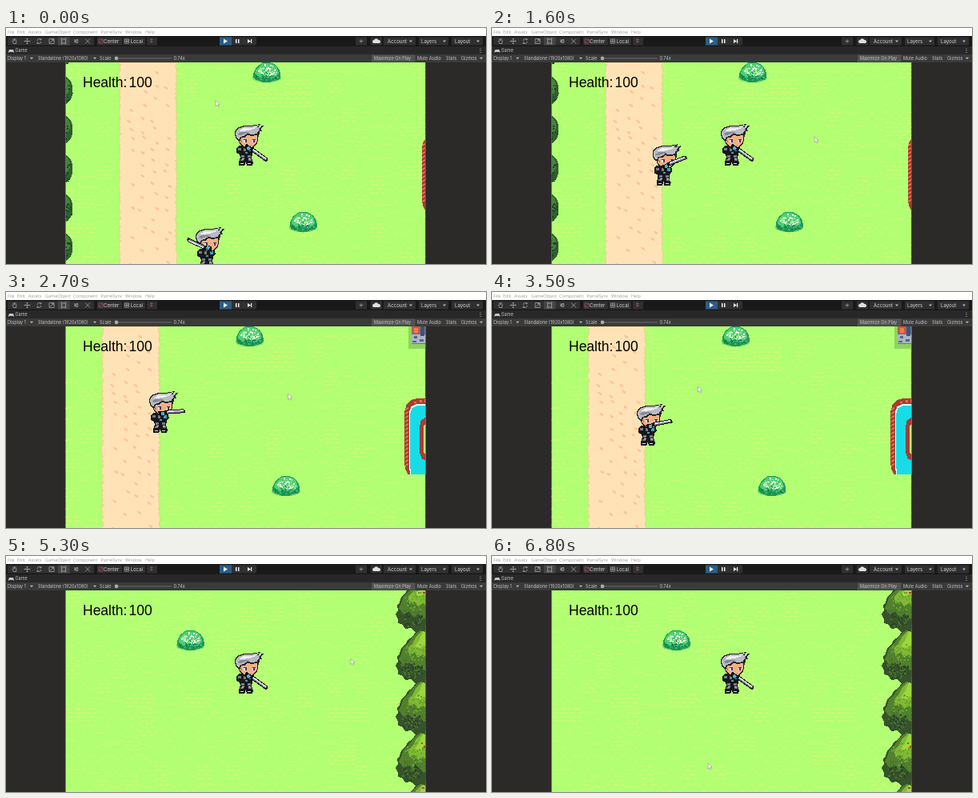
Write an HTML page that moves like this. It is 600x295 px and loops after 6900 ms.

```html
<!DOCTYPE html>
<html lang="en">
<head>
<meta charset="utf-8">
<title>Game view</title>
<style>
  html, body { margin: 0; width: 100%; height: 100%; overflow: hidden; background: #2b2a29; }
  svg { display: block; width: 100vw; height: 100vh; }
  .ui { font-family: Inter, sans-serif; font-size: 5.5px; fill: #c4c4c4; }
  .tool { font-size: 6.1px; fill: #d2d2d2; }
  .menu { font-family: "Open Sans", sans-serif; font-size: 5.5px; fill: #9a9a9a; }
  .health { font-family: "Liberation Sans", Arial, sans-serif; font-size: 17.5px; fill: #000; }
  .px { shape-rendering: crispEdges; }
  .icon { fill: none; stroke: #b4b4b4; stroke-width: .7; }
  .red { stroke: #b0525c; }
</style>
</head>
<body>
<svg id="stage" viewBox="0 0 600 295"></svg>
<script>
const LOOP = 6900, STEP = 100;

function seeded(seed) {
  return () => (seed = (seed * 16807) % 2147483647) / 2147483647;
}
const rect = (x, y, w, h, fill, extra = '') =>
  `<rect x="${x}" y="${y}" width="${w}" height="${h}" fill="${fill}" ${extra}/>`;
const ellipse = (x, y, rx, ry, fill) =>
  `<ellipse cx="${x}" cy="${y}" rx="${rx}" ry="${ry}" fill="${fill}"/>`;
const path = (d, fill, extra = '') => `<path d="${d}" fill="${fill}" ${extra}/>`;
const text = (x, y, s, cls = 'ui') => `<text x="${x}" y="${y}" class="${cls}">${s}</text>`;
const at = (x, y, body) => `<g transform="translate(${x} ${y})">${body}</g>`;
const caret = (x, y) => path(`M${x} ${y}h4l-2 2.4z`, '#b8b8b8');

// Sprinkles small marks inside an ellipse.
function speckle(rnd, count, x, y, rx, ry, size) {
  let d = '';
  for (let i = 0; i < count; i++) {
    const a = rnd() * 6.283, r = Math.sqrt(rnd());
    d += `M${(x + Math.cos(a) * r * rx).toFixed(1)} ${(y + Math.sin(a) * r * ry).toFixed(1)}h${size}v${size}h-${size}z`;
  }
  return d;
}

// Thin rows of tufts, with dense patches scattered between them.
function grass(seed, width) {
  const rnd = seeded(seed), CELL = 18;
  let d = '';
  const tuft = (x, y) => d += `M${x} ${y}h1v1h1v-1h2v1h1v1h-4v-1h-1z`;
  for (let y = 46; y < 295; y += CELL) {
    for (let x = 76; x < 75 + width; x += CELL) {
      const kind = rnd();
      if (kind < .14) {
        for (let i = 0; i < 12; i++) tuft(x + (i % 3) * 6 + (i % 2) * 2, y + Math.floor(i / 3) * 5);
      } else if (kind < .85) {
        for (let i = 0; i < 3; i++) tuft(x + i * 6, y + 4 + Math.floor(rnd() * 3) * 4);
      }
    }
  }
  return rect(74, 43, width, 252, '#b2ff73') + path(d, '#cafa76');
}

function road() {
  const rnd = seeded(41);
  let left = '', right = '', spots = '';
  for (let y = 43; y < 296; y += 2) {
    left += `L${(141 + rnd() * 2).toFixed(1)} ${y}v2`;
    right = `L${(213.8 - rnd() * 2).toFixed(1)} ${y + 2}v-2` + right;
  }
  for (let y = 50; y < 295; y += 14) {
    for (let x = 149; x < 208; x += 15) {
      if (rnd() < .3) continue;
      const px = x + rnd() * 8, py = y + rnd() * 9;
      spots += `M${px.toFixed(1)} ${py.toFixed(1)}h3v1h2v3h-2v-1h-2v-2h-1z`;
    }
  }
  return path('M142 43' + left + right + 'z', '#ffe3b6', 'stroke="#e6d28b" stroke-width=".8"') +
    path(spots, '#ffc3a0');
}

function bush(x, y) {
  const rnd = seeded(17);
  return at(x, y,
    ellipse(0, 7, 18, 6.5, '#7fd96a') +
    path('M-17 6L-17 2-15-2-13-6-9-9-5-12H4L9-10 13-7 16-2 17 2 17 7 14 10 8 11 4 13H-5L-9 11-14 10z', '#1f9a58') +
    path('M-15 2L-13-4-9-8-5-11H4L9-9 13-5 15 2 10 6 5 4 1 7-4 5-9 7z', '#4fce74') +
    path(speckle(rnd, 30, -1, 5, 14, 5, 1.5), '#118050') +
    path(speckle(rnd, 22, 0, 6, 14, 4, 1.5), '#3fbf70') +
    path(speckle(rnd, 40, 0, -2, 13, 7, 1.5), '#9df08c') +
    path(speckle(rnd, 24, 0, -3, 12, 7, 1.8), '#f4fff0'));
}

// A fir-like crown cut by the right edge of the view; y is its foot.
function crown(y) {
  const rnd = seeded(Math.round(y) + 5);
  return at(524, y,
    path('M4-76L-3-71-6-66-12-62-16-56-22-52-25-46-30-42-32-35-35-31-34-25-37-20-34-14-34-9-28-7-25-2-18-3-13 2-6 0 4 3z', '#36532b') +
    path('M4-74L-5-65-13-59-20-50-27-43-30-34-33-28-27-20-20-24-15-17-8-21-2-14 4-17z', '#52812d') +
    path('M4-72L-4-64-11-57-15-49-21-42-20-34-13-36-9-30-3-34 4-28z', '#80ba34') +
    path('M4-69L-4-60-8-51-13-44-6-42-2-46 4-42z', '#9cd83d') +
    path(speckle(rnd, 40, -18, -19, 14, 14, 2), '#4b7430') +
    path(speckle(rnd, 24, -17, -14, 14, 11, 2), '#294428') +
    path(speckle(rnd, 30, -14, -38, 12, 14, 2), '#6ca331'));
}

function hedge() {
  let s = '';
  const rnd = seeded(9);
  for (let y = 29; y < 300; y += 49) {
    s += ellipse(73, y, 10.5, 17, '#2d6130') + ellipse(73, y - 5, 7, 10, '#488238') +
      path(speckle(rnd, 24, 74, y + 3, 8, 13, 1.6), '#1d4428');
  }
  return s;
}

function pond() {
  let rim = '';
  for (let y = 146; y < 219; y += 5) rim += `M520 ${y}l4-2v2l-4 2z`;
  return path('M524 228L521 222 519.5 214V150L522 141 528 135 535 133H570V228z', '#a83d35') +
    path(rim, '#e5705a') +
    path('M527 228L525 218V151L528 143 535 140H570V228z', '#e4fff8') +
    path('M528 228L526.5 218V152L529 145 536 142H570V228z', '#18dce5') +
    path('M570 157H545L540 161 538.5 168V201L541 208 546 211H570z', '#a83d35') +
    path('M570 163H548L543.5 168V200L548 205H570z', '#b2ff73') +
    path('M531 137h3v2h-3zM538 135h3v3h-3zM544 134h2v4h-2z', '#e5705a');
}

const house = () =>
  rect(524.5, 43, 40, 27.5, '#8fd361') + rect(528, 43, 40, 22, '#6b7590') +
  rect(529, 43, 9, 9, '#d65532') + rect(531, 45, 5, 6, '#ed7c49') +
  rect(528, 53, 40, 11, '#aab6c8') + rect(539, 43, 5, 12, '#445078') +
  path('M531 55h4v3h-4zM538 59h5v3h-5zM529 61h5v2h-5z', '#59647f');

const BODY =
  // torso and legs
  path('M-14 3L-11 0H7L9 6 6 10 5 16 7 21 6 25H-1L-2 20-4 25H-11L-11 20-9 15-10 11-14 9z', '#17171c') +
  path('M-12 3h4v3h-4zM-5 3h3v4h-3zM-8 12h4v3h-4zM0 12h4v3h-4zM-9 17h4v2h-4zM1 17h4v2h-4z', '#767b86') +
  path('M-9 22h4v1h-4zM0 22h4v1h-4zM-7 16h3v1h-3zM1 16h3v1h-3z', '#dfe2e8') +
  path('M2 3h4v4h-4zM-3 8h3v2h-3z', '#3f9fae') +
  // face
  path('M-11-14H13L13-6 11-1 6 3H-3L-8 0-11-5z', '#2a1a1a') +
  path('M-10-14H12L12-6 10-2 5 2H-2L-7-1-10-5z', '#f0b084') +
  path('M-9-7h2v3h-2zM-1 0h6v1h-6z', '#c97a5c') +
  path('M-5-7h4v3h-4zM6-7h3v3h-3z', '#f8ecea') +
  path('M-5-8h4v1h-4zM-3-7h2v3h-2zM6-8h4v1h-4zM7-7h2v3h-2z', '#4a3560') +
  // hair
  path('M-12-6L-15-10-16-15-15-20-11-23-5-25H3L10-26 16-27 14-24 20-25 17-21 18-18 15-18 14-10 11-13 5-12 0-13-4-10-8-10-9-6z', '#26262b') +
  path('M-12-8L-14-11-15-15-14-19-10-22-4-24H4L10-25 14-26 11-23 17-24 14-20 15-19 13-18 12-15 5-14 0-15-5-12-9-11-10-8z', '#b9bbc2') +
  path('M-11-18L-5-22H5L12-24 8-21 1-19-7-18z', '#f0f0f3') +
  path('M-13-14L-8-17-1-17 4-16-3-15-9-13z', '#868995');

const GUN =
  path('M-5-2H3L5-3H27L29-1V2H4L2 4H-3z', '#0b0c10') +
  rect(6, -2, 21, 1.5, '#eceef1') + rect(6, -.5, 21, 1.5, '#80848e') +
  path('M-1-1h4v4h-4z', '#4fb4c4');

const hero = id => `<g id="${id}">${BODY}<g id="${id}Gun">${GUN}</g></g>`;

function sparkShape() {
  const rnd = seeded(23);
  return path('M-9-3h6v-2h6v2h4v2h7v1h-6v2h4v1h-7v2h-6v1h-5v-3h-6v-1h4z', '#d8fbff', 'opacity=".75"') +
    path(speckle(rnd, 22, -1, 0, 10, 6, 1.3), '#6dbcf4') +
    path(speckle(rnd, 24, 1, 0, 12, 7, 1.2), '#fff') +
    path('M-6-3h8v1h-7v4h5v-2h-2v-1h3v4h-7z', '#438fd8') +
    path('M5-2L16-6 8 0 17 1 7 2 14 7 3 3z', '#f4ffff');
}

function editor() {
  const menu = [[2, 'File'], [14, 'Edit'], [28, 'Assets'], [49, 'GameObject'], [84, 'Component'],
    [118.5, 'ParrelSync'], [149, 'Window'], [174, 'Help']];
  const buttons = [[2, 108], [114, 31], [146, 28], [176, 13], [267, 46], [437, 14], [456, 14],
    [472, 40], [516, 37], [557, 39]];
  const icons = 'M8 16l1.500 3.500h3L13 15.500M9 16.500v-3M10.500 16v-3M12 16v-3' +
    'M23 16.500h7M26.500 13v7M24 15.500l-1 1 1 1M29 15.500l1 1-1 1M25.500 14l1-1 1 1M25.500 19l1 1 1-1' +
    'M39 16a2.800 2.800 0 0 1 5-1.500M44 17a2.800 2.800 0 0 1-5 1.500M44 13v1.800h-2M39 20v-1.800h2' +
    'M54 13.500h6v6h-6zM55 18.500l4-4M57 14.500h2v2' +
    'M69.500 14h5v5h-5zM68.500 13h2M73.500 13h2M68.500 20h2M73.500 20h2' +
    'M85 18l5-4M85 14.500l5 4M86 16.500a2 2 0 1 0 4 0 2 2 0 1 0-4 0' +
    'M99 13.500l6 6M105 13.500l-6 6' +
    'M148.500 14h5v5h-5zM151 14v5M148.500 16.500h5';
  const redIcons = 'M116 14h5v5h-5zM116 19l5-5M180 14.500h4M180 17h4M181.500 13v6';
  return rect(0, 0, 600, 10, '#fff') + menu.map(([x, s]) => text(x, 7, s, 'menu')).join('') +
    rect(0, 10, 600, 13, '#191919') +
    buttons.map(([x, w]) => rect(x, 11.5, w, 10, '#303030')).join('') +
    rect(65, 11.5, 14.5, 10, '#464646') + rect(267, 11.5, 15, 10, '#2c5d87') +
    path(icons, 'none', 'class="icon"') + path(redIcons, 'none', 'class="icon red"') +
    path('M444 14v5M441.500 16.500h5M442.500 15l3 3M445.500 15l-3 3', 'none', 'class="icon" opacity=".6"') +
    path('M272 13.5l5 3-5 3zM287 14h1.5v5h-1.5zM290 14h1.5v5h-1.5zM302 14l4 2.5-4 2.5zM306 14h1.2v5h-1.2z', '#eee') +
    path('M460 19a2 2 0 0 1 0-4 3 3 0 0 1 5.5 0 2 2 0 0 1 1 4z', '#ddd') +
    text(122, 18.8, 'Center', 'ui tool') + text(155.5, 18.8, 'Local', 'ui tool') +
    text(477, 18.8, 'Account', 'ui tool') + text(519, 18.8, 'Layers', 'ui tool') +
    text(561, 18.8, 'Layout', 'ui tool') + caret(504, 15.5) + caret(546, 15.5) + caret(588, 15.5) +
    rect(0, 23, 600, 10, '#282828') +
    path('M4 27h5l1.5 4-2-1h-4l-2 1z', '#c4c4c4') + text(11.5, 30.3, 'Game') +
    path('M592.5 25.5h1v1h-1zM592.5 27.7h1v1h-1zM592.5 30h1v1h-1z', '#bbb') +
    rect(0, 33, 600, 10, '#3a3a3a') + rect(457, 33.5, 54.5, 9, '#525252') +
    text(2, 40, 'Display 1') + caret(30, 36.8) + text(40, 40, 'Standalone (1920x1080)') +
    caret(109, 36.8) + text(117, 40, 'Scale') + rect(137, 37.5, 70, .8, '#777') +
    '<circle cx="138" cy="37.9" r="2.3" fill="#aaa"/>' + text(209.5, 40, '0.74x') +
    text(460, 40, 'Maximize On Play') + text(514, 40, 'Mute Audio') + text(550, 40, 'Stats') +
    text(569, 40, 'Gizmos') + caret(592, 36.8);
}

const treeRow = [93, 157, 221, 285, 349].reverse().map(crown).join('');
document.getElementById('stage').innerHTML =
  '<defs><clipPath id="view"><rect x="74.5" y="43" width="449.7" height="252"/></clipPath></defs>' +
  rect(0, 0, 600, 295, '#2b2a29') +
  `<g clip-path="url(#view)" class="px">
    <g id="field">${grass(7, 510)}${road()}${hedge()}${bush(326, 55)}${bush(371.5, 242)}${pond()}${house()}</g>
    <g id="forest">${grass(73, 451)}${bush(230.5, 105)}${treeRow}
      ${path('M521 45h3v2h-3zM519 233h2v2h-2zM522 237h2v3h-2zM520 289h3v2h-3z', '#b4404a')}</g>
    ${hero('player')}${hero('rival')}<g id="spark">${sparkShape()}</g>
  </g>` + editor() +
  text(96, 74.4, 'Health:', 'health') + text(153.5, 74.4, '100', 'health') +
  `<g id="cursor">${path('M0 0V7L1.7 5.5 3 8 4.2 7.4 3 5H5z', '#fff', 'stroke="#777" stroke-width=".5"')}</g>`;

// Keys: time, then values.
const CURSOR = [[0, 262, 90.5], [300, 290, 77], [700, 358, 84], [900, 388, 95], [1200, 416, 118],
  [1500, 403, 136], [2300, 403, 135.5], [2800, 340, 125], [3500, 257.5, 118], [4300, 400, 130],
  [4700, 435, 127.5], [5300, 431, 128.5], [5700, 431, 128.5], [6400, 290, 240], [6800, 270, 259]];
const RIVAL = [[0, 253, 276, 205], [900, 226, 195, 314], [1400, 217, 184, 330], [2100, 215.5, 143, 360],
  [2300, 215.5, 143, 360], [3500, 218.5, 167, 349]];
const CAMERA = [[2200, 0], [2300, 5.5], [2600, 21.5]];

function track(keys, t) {
  const next = keys.findIndex(k => k[0] > t);
  if (next === 0) return keys[0].slice(1);
  if (next < 0) return keys[keys.length - 1].slice(1);
  const a = keys[next - 1], b = keys[next], p = (t - a[0]) / (b[0] - a[0]);
  return a.slice(1).map((v, i) => v + (b[i + 1] - v) * p);
}

const el = id => document.getElementById(id);
const place = (id, transform) => el(id).setAttribute('transform', transform);
const show = (id, on) => el(id).setAttribute('display', on ? 'inline' : 'none');

function draw(t) {
  const respawned = t >= 5000;
  const [camera] = track(CAMERA, t);
  const [cx, cy] = track(CURSOR, t);
  const [rx, ry, aim] = track(RIVAL, t);
  const spin = t < 4300 ? 1 : Math.max(.06, Math.cos((t - 4300) / 400 * Math.PI / 2));

  show('field', !respawned);
  show('forest', respawned);
  place('field', `translate(${-camera} 0)`);

  show('player', t < 2200 || respawned);
  place('player', 'translate(302 147)');
  place('playerGun', 'translate(1 2) rotate(36)');

  show('rival', !respawned);
  place('rival', `translate(${rx - camera - 2.5} ${ry}) scale(${spin} 1) translate(2.5 0)`);
  place('rivalGun', `rotate(${aim})`);

  show('spark', t >= 2200 && t < 2500);
  place('spark', `translate(297 142) scale(${t < 2300 ? .7 : t < 2400 ? 1 : .8})`);
  place('cursor', `translate(${cx} ${cy})`);
}

const start = performance.now();
function tick() {
  const t = (performance.now() - start) % LOOP;
  draw(Math.floor(t / STEP) * STEP);
  requestAnimationFrame(tick);
}
tick();
</script>
</body>
</html>
```
